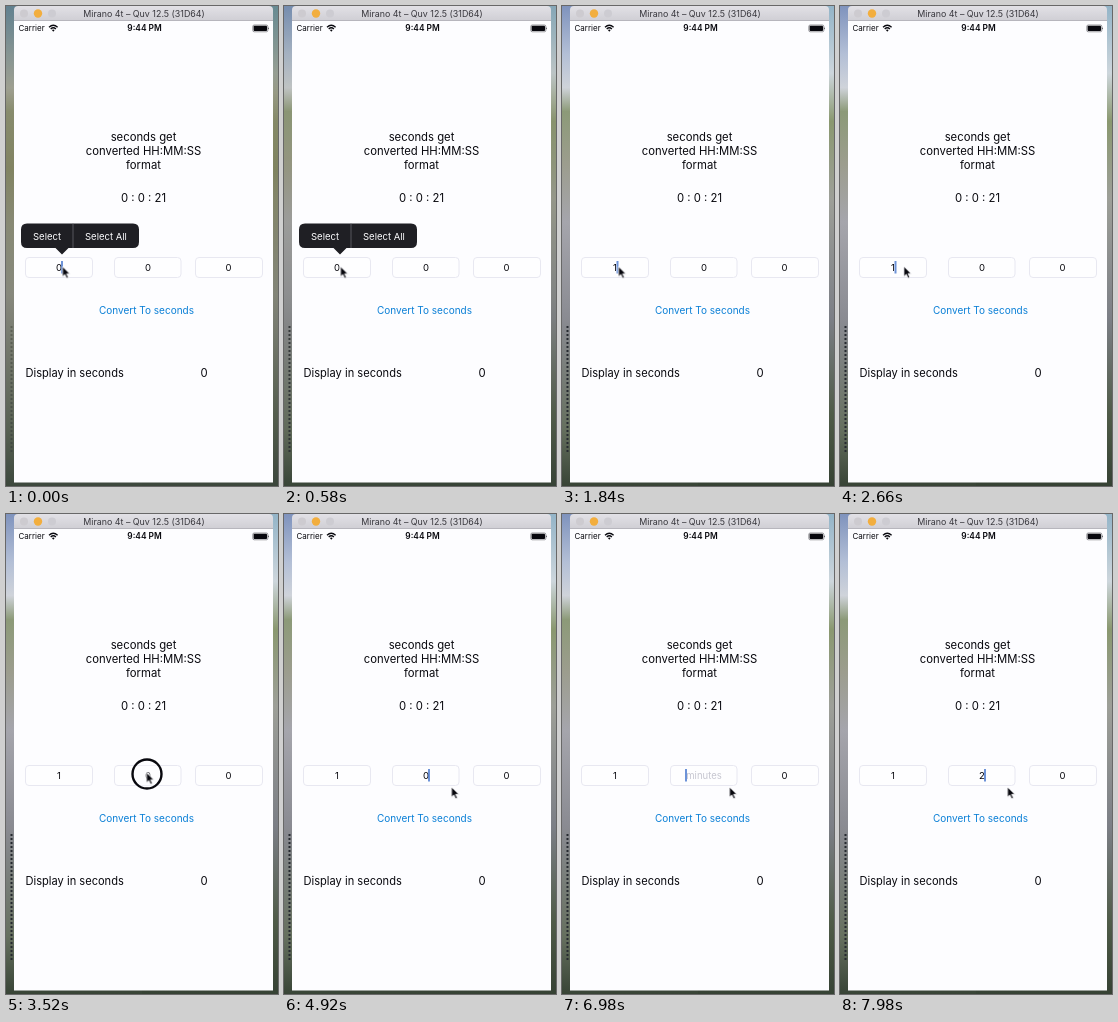
Write an HTML page that moves like this. It is 272 by 480 pixels and loops after 8 s.

```html
<!DOCTYPE html>
<html lang="en">
<head>
<meta charset="utf-8">
<title>Time converter</title>
<style>
html, body { margin: 0; width: 100%; height: 100%; overflow: hidden; background: #fdfdff; }
svg { display: block; width: 100vw; height: 100vh; }
text { font: 9.5px Inter, "Open Sans", sans-serif; fill: #08080e; }
.mid { text-anchor: middle; }
.large { font-size: 11.3px; }
.small { font-size: 8px; }
.hint { fill: #c6c6d0; }
.field { fill: #fefeff; stroke: #e6e6f0; stroke-width: .9; }

/* Every part shares one 8 s clock. */
.anim { animation: 8s step-end infinite; }
.dusk { animation-name: dusk; animation-timing-function: linear; }
.menu { animation-name: menu; animation-timing-function: linear; }
.hour-old { animation-name: hourOld; }
.hour-hint { animation-name: hourHint; }
.hour-new { animation-name: hourNew; }
.min-old { animation-name: minOld; }
.min-hint { animation-name: minHint; }
.min-new { animation-name: minNew; }
.place { animation-name: place; }
.blink { animation-name: blink; }
.ring { animation-name: ring; }
.pointer { animation-name: pointer; animation-timing-function: ease-in-out; }

@keyframes dusk { 0% { opacity: .7 } 10.5%, 100% { opacity: 0 } }
@keyframes menu { 0%, 12% { opacity: 1 } 15.1%, 100% { opacity: 0 } }
@keyframes hourOld { 0% { opacity: 1 } 12%, 100% { opacity: 0 } }
@keyframes hourHint { 0% { opacity: 0 } 12% { opacity: 1 } 20.75%, 100% { opacity: 0 } }
@keyframes hourNew { 0% { opacity: 0 } 20.75%, 100% { opacity: 1 } }
@keyframes minOld { 0% { opacity: 1 } 83.75%, 100% { opacity: 0 } }
@keyframes minHint { 0% { opacity: 0 } 83.75% { opacity: 1 } 95%, 100% { opacity: 0 } }
@keyframes minNew { 0% { opacity: 0 } 95%, 100% { opacity: 1 } }
@keyframes place {
  0% { transform: translateX(56px) }
  12% { transform: translateX(39.5px) }
  20.75% { transform: translateX(55.5px) }
  44% { transform: translateX(145px) }
  83.75% { transform: translateX(124px) }
  95%, 100% { transform: translateX(145px) }
}
@keyframes blink {
  0%, 12%, 20.75%, 33.25%, 45.5%, 58%, 70.5%, 83.75%, 95%, 100% { opacity: 1 }
  6.25%, 18.5%, 27%, 39.5%, 51.75%, 64.25%, 76.75%, 90% { opacity: 0 }
}
@keyframes ring { 0% { opacity: 0 } 42.5% { opacity: 1 } 46%, 100% { opacity: 0 } }
@keyframes pointer {
  0%, 31.25% { transform: translate(56.5px, 260.5px) }
  41%, 47.5% { transform: translate(140.5px, 258.5px) }
  54%, 100% { transform: translate(167.5px, 273px) }
}
</style>
</head>
<body>
<svg viewBox="0 0 272 480" preserveAspectRatio="none">
  <defs>
    <linearGradient id="left" x2="0" y2="1">
      <stop offset="0" stop-color="#7f93bd"/>
      <stop offset=".1" stop-color="#b3bfd6"/>
      <stop offset=".17" stop-color="#cfd3da"/>
      <stop offset=".22" stop-color="#8c9a78"/>
      <stop offset=".33" stop-color="#9c9d8e"/>
      <stop offset=".45" stop-color="#a5a5ac"/>
      <stop offset=".65" stop-color="#8a8b92"/>
      <stop offset=".88" stop-color="#66705f"/>
      <stop offset="1" stop-color="#384436"/>
    </linearGradient>
    <linearGradient id="right" x2="0" y2="1">
      <stop offset="0" stop-color="#93b4c8"/>
      <stop offset=".14" stop-color="#cdd6dc"/>
      <stop offset=".24" stop-color="#8a9870"/>
      <stop offset=".4" stop-color="#9d9f98"/>
      <stop offset=".65" stop-color="#7c7f86"/>
      <stop offset=".85" stop-color="#4f5b48"/>
      <stop offset="1" stop-color="#364234"/>
    </linearGradient>
    <linearGradient id="dusk" x2="0" y2="1">
      <stop offset="0" stop-color="#55797c"/>
      <stop offset=".18" stop-color="#8b8a72"/>
      <stop offset=".34" stop-color="#76794f"/>
      <stop offset=".6" stop-color="#838571"/>
      <stop offset="1" stop-color="#3f4a40"/>
    </linearGradient>
    <linearGradient id="bar" x2="0" y2="1">
      <stop offset="0" stop-color="#e2e1e6"/>
      <stop offset="1" stop-color="#cfced4"/>
    </linearGradient>
  </defs>

  <rect width="136" height="480" fill="url(#left)"/>
  <rect x="136" width="136" height="480" fill="url(#right)"/>
  <path d="M5.5 320V448" stroke="#262a30" stroke-width="2" stroke-dasharray="2 2"/>
  <rect class="anim dusk" width="272" height="480" fill="url(#dusk)"/>

  <rect x="8" y="14" width="259" height="462.5" fill="#fdfdff"/>
  <path d="M8 15V4Q8 0 12 0H263Q267 0 267 4V15Z" fill="url(#bar)"/>
  <path d="M8 14.5H267" stroke="#b7b6bd"/>
  <circle cx="18" cy="7.5" r="4" fill="#cdcbd0"/>
  <circle cx="32" cy="7.5" r="4.2" fill="#f2ae3e"/>
  <circle cx="46" cy="7.5" r="4" fill="#cdccd2"/>
  <text class="mid" x="138" y="11.3" style="font-size:8.9px;fill:#38373d">Mirano 4t – Quv 12.5 (31D64)</text>

  <text class="small" x="12.5" y="25">Carrier</text>
  <path d="M43 21.2Q47.3 17.2 51.6 21.2M44.7 23Q47.3 20.6 49.9 23" fill="none" stroke="#08080e" stroke-width="1.3"/>
  <path d="M45.9 24.1Q47.3 22.9 48.7 24.1L47.3 25.7Z" fill="#08080e"/>
  <text class="mid" x="138.5" y="25" style="font-size:8.4px;font-weight:600">9:44 PM</text>
  <rect x="246.8" y="19" width="15" height="6.8" rx="1.4" fill="#fdfdff" stroke="#55555c" stroke-width=".6"/>
  <rect x="247.6" y="19.8" width="13.4" height="5.2" rx=".8" fill="#08080e"/>
  <path d="M262.4 21.2Q263.7 22.4 262.4 23.6Z" fill="#08080e"/>

  <g class="mid">
    <text class="large" x="137.5" y="135">seconds get</text>
    <text class="large" x="137.5" y="149">converted HH:MM:SS</text>
    <text class="large" x="137.5" y="163">format</text>
    <text class="large" x="137.5" y="196">0 : 0 : 21</text>
    <text x="140.5" y="307.5" style="font-size:10px;fill:#0a7fd6">Convert To seconds</text>
    <text class="large" x="198" y="371">0</text>
  </g>
  <text x="19.5" y="371" style="font-size:11.1px">Display in seconds</text>

  <rect class="field" x="19.5" y="251.5" width="67" height="20" rx="3.5"/>
  <rect class="field" x="108.5" y="251.5" width="66.5" height="20" rx="3.5"/>
  <rect class="field" x="189.5" y="251.5" width="67" height="20" rx="3.5"/>
  <g class="mid">
    <text class="anim hour-old" x="53" y="265">0</text>
    <text class="anim hour-hint hint" x="53" y="265">hours</text>
    <text class="anim hour-new" x="53" y="265">1</text>
    <text class="anim min-old" x="142" y="265">0</text>
    <text class="anim min-hint hint" x="142" y="265">minutes</text>
    <text class="anim min-new" x="142" y="265">2</text>
    <text x="222.5" y="265">0</text>
  </g>
  <g class="anim place"><rect class="anim blink" x="-.7" y="255" width="1.4" height="12.5" fill="#2f66c8"/></g>

  <g class="anim menu">
    <path d="M21 217.5H127Q133 217.5 133 223.5V236Q133 242 127 242H62.5L56 248.5L49.5 242H21Q15 242 15 236V223.5Q15 217.5 21 217.5Z" fill="#1f1f24"/>
    <path d="M67 217.5V242" stroke="#66666c" stroke-width=".8"/>
    <text x="27" y="233.5" style="fill:#fdfdff">Select</text>
    <text x="79" y="233.5" style="fill:#fdfdff">Select All</text>
  </g>

  <circle class="anim ring" cx="141" cy="260" r="14.5" fill="#fdfdff" fill-opacity=".35" stroke="#08080e" stroke-width="2.4"/>
  <path class="anim pointer" d="M0 0V10.2L2.4 8L4.1 11.8L5.9 11L4.2 7.3H7.4Z" fill="#08080e" stroke="#fdfdff" stroke-width=".8"/>
</svg>
</body>
</html>
```
